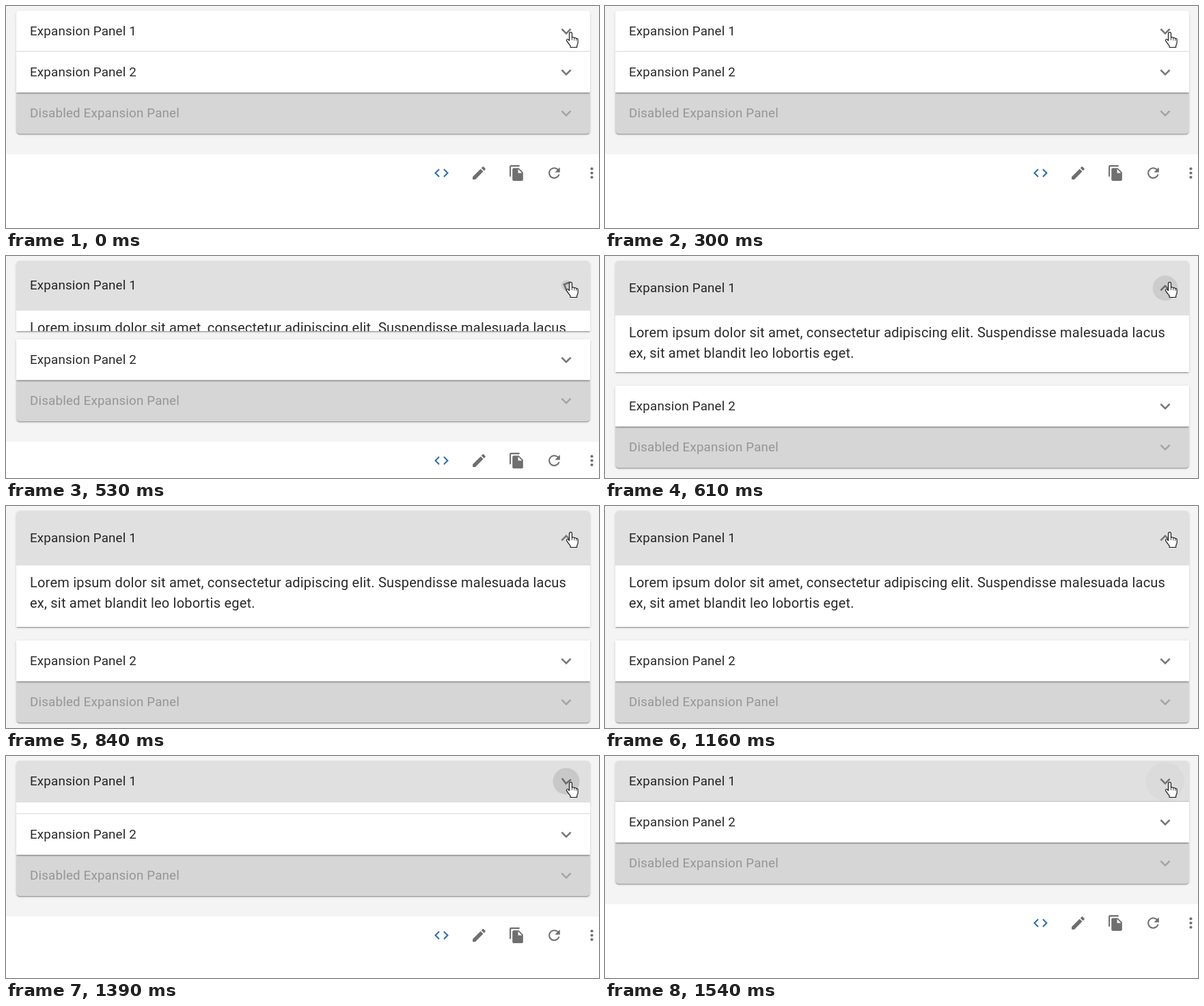
Animation, 868 px wide and 325 px high, one loop 1.78 s. Source, as an HTML page:

```html
<!DOCTYPE html>
<html lang="en">
<head>
<meta charset="utf-8">
<title>Expansion panels</title>
<style>
html, body { margin: 0; width: 100%; height: 100%; overflow: hidden; background: #fff; }
#stage { position: relative; width: 868px; height: 325px; overflow: hidden; background: #fff;
  font-family: Roboto, sans-serif; color: rgba(0,0,0,.84); letter-spacing: .00938em; }
#demo { padding: 7px 13px 30px 15px; background: #f4f4f5; }
.panel { position: relative; background: #fff;
  box-shadow: 0 2.5px 1.25px -1.25px rgba(0,0,0,.2), 0 1.25px 1.25px rgba(0,0,0,.14), 0 1.25px 3.75px rgba(0,0,0,.12); }
.panel + .panel::before { content: ""; position: absolute; left: 0; right: 0; top: -1px; height: 1px; background: rgba(0,0,0,.12); }
.open + .panel::before { display: none; }
.panel:first-child, .panel:first-child .head { border-radius: 5px 5px 0 0; }
.panel:last-child { border-radius: 0 0 5px 5px; }
.panel.off { background: rgba(0,0,0,.12); color: rgba(0,0,0,.3); }
.head { position: relative; height: 60px; display: flex; align-items: center; padding-left: 20px;
  font-size: 18.75px; line-height: 1.5; letter-spacing: .00938em; white-space: nowrap; }
.arrow { position: absolute; left: 790px; top: 50%; margin-top: -15px; width: 30px; height: 30px; fill: #757575; }
.off .arrow { fill: rgba(0,0,0,.23); }
#ripple { position: absolute; left: 775px; top: 50%; margin-top: -30px; width: 60px; height: 60px; border-radius: 50%; background: #000; }
#body { height: 0; overflow: hidden; }
#body p { margin: 0; padding: 10px 20px 20px; font-size: 20px; line-height: 30px; letter-spacing: .0109em; white-space: nowrap; }
#tools { position: relative; height: 110px; background: #fff; }
#tools svg { position: absolute; top: 15px; width: 25px; height: 25px; fill: #6f6f6f; }
#hand { position: absolute; left: 0; top: 0; }
</style>
</head>
<body>
<div id="stage">
  <div id="demo">
    <div class="panel" id="first">
      <div class="head" id="head">Expansion Panel 1
        <svg class="arrow" id="arrow" viewBox="0 0 24 24"><path d="M16.59 8.59L12 13.17 7.41 8.59 6 10l6 6 6-6z"/></svg>
        <div id="ripple"></div>
      </div>
      <div id="body"><p>Lorem ipsum dolor sit amet, consectetur adipiscing elit. Suspendisse malesuada lacus<br>ex, sit amet blandit leo lobortis eget.</p></div>
    </div>
    <div class="panel">
      <div class="head">Expansion Panel 2
        <svg class="arrow" viewBox="0 0 24 24"><path d="M16.59 8.59L12 13.17 7.41 8.59 6 10l6 6 6-6z"/></svg>
      </div>
    </div>
    <div class="panel off">
      <div class="head">Disabled Expansion Panel
        <svg class="arrow" viewBox="0 0 24 24"><path d="M16.59 8.59L12 13.17 7.41 8.59 6 10l6 6 6-6z"/></svg>
      </div>
    </div>
  </div>
  <div id="tools">
    <svg viewBox="0 0 24 24" style="left:625px;fill:#2f6fb0"><path d="M9.4 16.6L4.8 12l4.6-4.6L8 6l-6 6 6 6 1.4-1.4zm5.2 0l4.6-4.6-4.6-4.6L16 6l6 6-6 6-1.4-1.4z"/></svg>
    <svg viewBox="0 0 24 24" style="left:680px"><path d="M3 17.25V21h3.75L17.81 9.94l-3.75-3.75L3 17.25zM20.71 7.04c.39-.39.39-1.02 0-1.41l-2.34-2.34c-.39-.39-1.02-.39-1.41 0l-1.83 1.83 3.75 3.75 1.83-1.83z"/></svg>
    <svg viewBox="0 0 24 24" style="left:735px"><path d="M16 1H4c-1.1 0-2 .9-2 2v14h2V3h12V1zm-1 4l6 6v10c0 1.1-.9 2-2 2H7.99C6.89 23 6 22.1 6 21l.01-14c0-1.1.89-2 1.99-2h7zm-1 7h5.5L14 6.5V12z"/></svg>
    <svg viewBox="0 0 24 24" style="left:790px"><path d="M17.65 6.35C16.2 4.9 14.21 4 12 4c-4.42 0-7.99 3.58-7.99 8s3.57 8 7.99 8c3.73 0 6.84-2.55 7.73-6h-2.08c-.82 2.33-3.04 4-5.65 4-3.31 0-6-2.69-6-6s2.69-6 6-6c1.66 0 3.14.69 4.22 1.78L13 11h7V4l-2.35 2.35z"/></svg>
    <svg viewBox="0 0 24 24" style="left:845px"><circle cx="12" cy="6" r="2"/><circle cx="12" cy="12" r="2"/><circle cx="12" cy="18" r="2"/></svg>
  </div>
  <svg id="hand" width="868" height="325" viewBox="0 0 868 325" stroke="#111" stroke-width="1.1" stroke-linejoin="round">
    <g transform="translate(-.5 0)">
      <path fill="#fff" d="M825 40.5c0-3 4-3 4 0v6c.5-1.2 3-1 3.3.6.6-1 2.8-.7 3 .9.8-.7 2.4-.2 2.4 1.4v4c0 2-1.2 3.3-1.5 4.7v2.4h-9.6v-2.2c-1.6-2-3.5-4.2-5.4-7.4-1-1.9 1-3 2.4-1.8l1.4 1.6z"/>
      <path fill="none" stroke-width=".8" d="M829 46.5v3.5M832.3 47.5v3M835.3 48.5v2.4"/>
    </g>
  </svg>
</div>
<script>
const LOOP = 1780;
// the picture is held between these moments
const TICKS = [0, 300, 380, 460, 530, 610, 690, 770, 840, 1160, 1310, 1390, 1470, 1540];
const PRESS = [390, 1160], OPEN = 469, CLOSE = 1277;
const $ = id => document.getElementById(id);
const first = $('first'), head = $('head'), body = $('body'), arrow = $('arrow'), ripple = $('ripple');
const clamp = x => Math.max(0, Math.min(1, x));

// cubic-bezier(.4, 0, .2, 1)
function ease(x) {
  if (x <= 0) return 0;
  if (x >= 1) return 1;
  let lo = 0, hi = 1, s = .5;
  for (let i = 0; i < 24; i++) {
    s = (lo + hi) / 2;
    const q = 1 - s;
    if (1.2 * q * q * s + .6 * q * s * s + s * s * s < x) lo = s; else hi = s;
  }
  return s * s * (3 - 2 * s);
}

const toggle = (t, ms) => ease((t - OPEN) / ms) - ease((t - CLOSE) / ms);

function render(t) {
  const grow = toggle(t, 150);
  const shade = Math.round(255 - 31 * ease((t - PRESS[0]) / 150));
  first.classList.toggle('open', t >= OPEN && t < CLOSE);
  first.style.marginBottom = 20 * grow + 'px';
  head.style.height = 60 + 20 * grow + 'px';
  head.style.backgroundColor = `rgb(${shade},${shade},${shade})`;
  body.style.height = 90 * toggle(t, 212) + 'px';
  arrow.style.transform = `rotate(${180 * grow}deg)`;

  const [down, up] = t < PRESS[1] ? [PRESS[0], OPEN] : [PRESS[1], CLOSE];
  const age = t - down;
  const fade = clamp((310 - (t - up)) / 200);
  ripple.style.transform = `scale(${ease(age / 550)})`;
  ripple.style.opacity = age < 0 ? 0 : .107 * Math.min(fade, .4 + age / 380);
}

const start = performance.now();
function loop() {
  const t = (performance.now() - start) % LOOP;
  render(TICKS.filter(k => k <= t).pop() || 0);
  requestAnimationFrame(loop);
}
loop();
</script>
</body>
</html>
```
